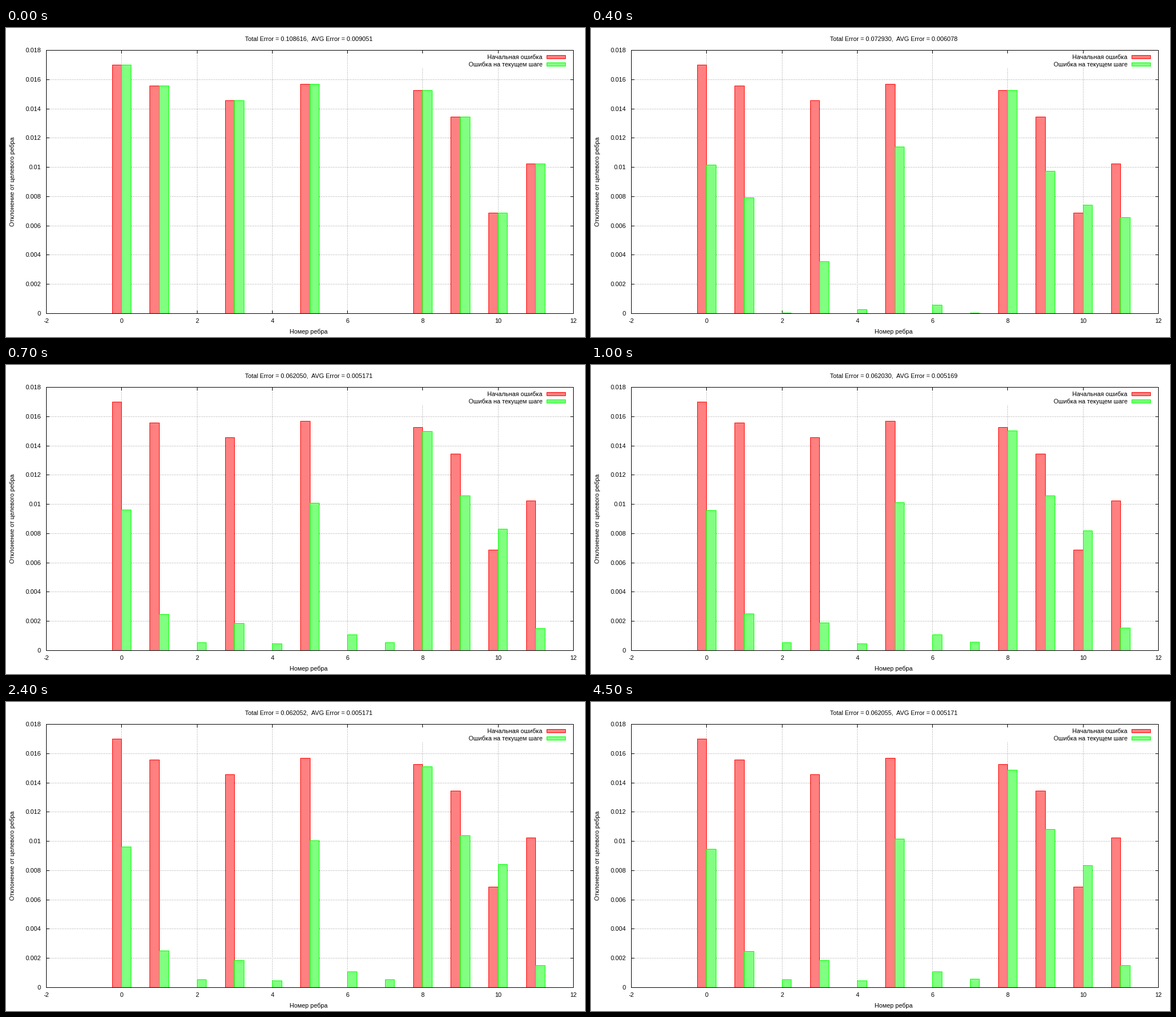
Write a matplotlib script that moves like this. It is 1025x547 px and loops after 5000 ms.

```python
import numpy as np
import matplotlib.pyplot as plt
from matplotlib.animation import FuncAnimation
from matplotlib.patches import Rectangle

W, H, DPI = 1025, 547, 64
PX = 72 / DPI                      # one pixel in points
LEFT, RIGHT, TOP, BOTTOM = 71, 1004, 39, 505
FRAMES, INTERVAL = 50, 100
RED = ("#ff8080", "#ff0000")
GREEN = ("#80ff80", "#00ff00")

plt.rcParams["font.family"] = "Liberation Sans"
plt.rcParams["font.size"] = 11 * PX

# Error per edge, in units of 1e-5: at first, half-way and once settled
START = np.array([1700, 1555, 0, 1455, 0, 1568, 0, 0, 1527, 1345.6, 686, 1025])
MIDWAY = np.array([1017, 791, 5, 354, 26, 1141, 58, 5, 1524, 975, 742, 655])
SETTLED = np.array([960, 248, 55, 185, 45, 1009, 108, 56, 1499, 1060, 830, 150])
MID_STEP, END_STEP = 3, 6

STEP_STARTS = [0, 1, *range(3, 11), 23, 24, 37, 39, 42, 45]


def errors(step):
    """Linear descent to the settled state, then a small trade-off wobble."""
    if step <= MID_STEP:
        return START + (MIDWAY - START) * step / MID_STEP
    if step <= END_STEP:
        t = (step - MID_STEP) / (END_STEP - MID_STEP)
        return MIDWAY + (SETTLED - MIDWAY) * t
    noise = SETTLED * np.random.default_rng(step).normal(0, 0.01, SETTLED.size)
    # Nearly cancel the sum, so the total hardly drifts
    return SETTLED + noise - 0.95 * noise.sum() * SETTLED / SETTLED.sum()


def px(x):
    return round(LEFT + (x + 2) * (RIGHT - LEFT) / 14) + 0.5


def py(y):
    return round(BOTTOM - y * (BOTTOM - TOP) / 0.018) + 0.5


fig = plt.figure(figsize=(W / DPI, H / DPI), dpi=DPI, facecolor="white")
ax = fig.add_axes([0, 0, 1, 1])
ax.set_xlim(0, W)
ax.set_ylim(H, 0)
ax.axis("off")


# Coordinates already sit on pixel centres, so snapping stays off
def line(xs, ys, z, color="black", **kw):
    ax.plot(xs, ys, color=color, lw=PX, zorder=z, snap=False, **kw)


def grid(xs, ys):
    line(xs, ys, 1, "#909090", ls=(0, (1, 2)))


def label(x, y, text, ha="center", **kw):
    return ax.text(x, y, text, ha=ha, va="baseline", zorder=6, **kw)


def box(x, y, w, h, z, fill, edge):
    return ax.add_patch(Rectangle((x, y), w, h, fc=fill, ec=edge, lw=PX,
                                  zorder=z, joinstyle="miter", snap=False))


def bar(x, value, z, colors):
    x0, x1, top = px(x), px(x + 0.25), py(value)
    return box(x0, top, x1 - x0, BOTTOM + 0.5 - top, z, *colors)


# Grid, ticks and tick labels
for i in range(10):
    y = py(i * 0.002)
    if 0 < i < 9:
        grid([LEFT + 1, RIGHT], [y, y])
    line([LEFT + 0.5, LEFT + 5.5], [y, y], 1.5)
    line([RIGHT - 4.5, RIGHT + 0.5], [y, y], 1.5)
    label(62, y + 3.5, f"{i * 0.002:.3f}".rstrip("0").rstrip("."), "right")

for v in range(-2, 13, 2):
    x = px(v)
    if -2 < v < 12:
        grid([x, x], [BOTTOM, 72 if v >= 8 else TOP + 1])
    line([x, x], [BOTTOM + 0.5, BOTTOM - 4.5], 1.5)
    line([x, x], [TOP + 0.5, TOP + 5.5], 1.5)
    label(x, 522, str(v))

box(LEFT + 0.5, TOP + 0.5, RIGHT - LEFT, BOTTOM - TOP, 5, "none", "black")

# Legend and captions
for y, text, colors in ((48.5, "Начальная ошибка", RED),
                        (61.5, "Ошибка на текущем шаге", GREEN)):
    label(949.5, y + 6.5, text, "right")
    box(957.5, y, 33, 6, 4, *colors)

title = label(535.7, 22, "")
label(535.7, 541, "Номер ребра")
label(15, 272, "Отклонение от целевого ребра", rotation=90,
      rotation_mode="anchor")

for i, v in enumerate(START):
    if v:
        bar(i - 0.25, v * 1e-5, 2, RED)
bars = [bar(i, v * 1e-5, 3, GREEN) for i, v in enumerate(START)]


def update(frame):
    step = int(np.searchsorted(STEP_STARTS, frame, side="right")) - 1
    values = errors(step) * 1e-5
    for rect, value in zip(bars, values):
        top = py(float(value))
        rect.set_y(top)
        rect.set_height(BOTTOM + 0.5 - top)
        rect.set_visible(top < BOTTOM)
    title.set_text(f"Total Error = {values.sum():.6f},  "
                   f"AVG Error = {values.mean():.6f}")
    return [*bars, title]


anim = FuncAnimation(fig, update, frames=FRAMES, interval=INTERVAL,
                     repeat=True, repeat_delay=0, blit=False)
plt.show()
```
